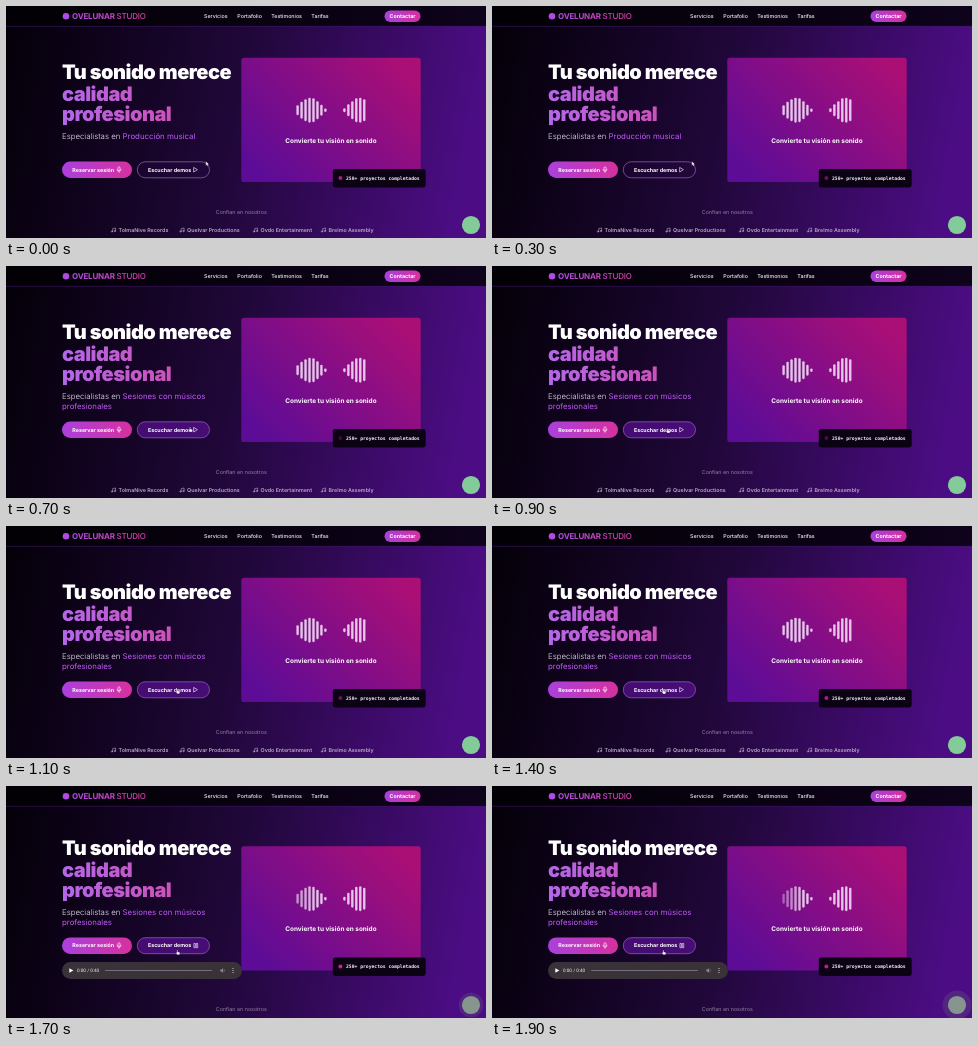
Recreate the animation shown at these times as an HTML page. Size 480 px wide and 232 px high, loop 2 s.

```html
<!DOCTYPE html>
<html lang="es">
<head>
<meta charset="utf-8">
<title>Estudio de sonido</title>
<style>
  html, body { margin: 0; width: 100%; height: 100%; overflow: hidden; background: #05000a; }
  svg { display: block; width: 480px; height: 232px; }
  text { font-family: Inter, sans-serif; font-size: 5.33px; fill: #f6f2fa; text-rendering: geometricPrecision; }
  .link { font-weight: 500; }
  .title { font-size: 20px; font-weight: 900; letter-spacing: -.025em; fill: #fff; }
  .title.tinted { fill: url(#titleInk); }
  .brand { font-size: 8px; font-weight: 700; letter-spacing: -.025em; fill: url(#brandInk); }
  .brand .light { font-weight: 500; }
  .sub { font-size: 7.85px; font-weight: 300; fill: #eae3f2; }
  .sub .topic { font-weight: 400; fill: #bd5cf2; }
  .btn { font-weight: 700; fill: #fff; }
  .slogan { font-size: 6.45px; font-weight: 700; fill: #fff; text-anchor: middle; }
  .mono { font: 700 4.72px "DejaVu Sans Mono", monospace; }
  .trust { fill: #9384a4; text-anchor: middle; }
  .partners text { font-weight: 600; fill: #b7a8c6; }
  .time { font: 4.67px Roboto, sans-serif; fill: #eee; }
  .icon { fill: none; stroke: #fff; stroke-width: .6; stroke-linecap: round; stroke-linejoin: round; }
</style>
</head>
<body>
<svg viewBox="0 0 480 232" xmlns="http://www.w3.org/2000/svg">
  <defs>
    <linearGradient id="page" gradientUnits="userSpaceOnUse" x1="5" y1="10" x2="472" y2="100">
      <stop offset="0" stop-color="#040008"/>
      <stop offset=".5" stop-color="#200739"/>
      <stop offset="1" stop-color="#4c0d84"/>
    </linearGradient>
    <linearGradient id="bar">
      <stop offset="0" stop-color="#020004"/>
      <stop offset="1" stop-color="#0e031b"/>
    </linearGradient>
    <linearGradient id="brandInk" gradientUnits="userSpaceOnUse" x1="66" y1="0" x2="141" y2="0">
      <stop offset="0" stop-color="#b04be6"/>
      <stop offset="1" stop-color="#dc3fa9"/>
    </linearGradient>
    <linearGradient id="titleInk" gradientUnits="userSpaceOnUse" x1="56" y1="0" x2="228" y2="0">
      <stop offset="0" stop-color="#b368e8"/>
      <stop offset="1" stop-color="#d9459f"/>
    </linearGradient>
    <linearGradient id="pill">
      <stop offset="0" stop-color="#ab40dc"/>
      <stop offset="1" stop-color="#d6309f"/>
    </linearGradient>
    <linearGradient id="card" gradientUnits="userSpaceOnUse" x1="263" y1="176" x2="387" y2="52">
      <stop offset="0" stop-color="#5c0c97"/>
      <stop offset="1" stop-color="#aa0f76"/>
    </linearGradient>
  </defs>

  <rect width="480" height="232" fill="url(#page)"/>

  <g id="left">
    <text class="title" x="56" y="73.2">Tu sonido merece</text>
    <text class="title tinted" x="56" y="95">calidad</text>
    <text class="title tinted" x="56" y="114.7">profesional</text>
    <text class="sub" x="56" y="132.8">Especialistas en <tspan class="topic" id="topicA">Producción musical</tspan></text>
    <text class="sub" x="56" y="132.8" id="topicB"><tspan fill-opacity="0">Especialistas en </tspan><tspan class="topic">Sesiones con músicos</tspan><tspan class="topic" x="56" y="143.2">profesionales</tspan></text>

    <rect x="56" y="155.5" width="70" height="16.5" rx="8.25" fill="url(#pill)"/>
    <text class="btn" x="66.3" y="165.6">Reservar sesión</text>
    <path class="icon" d="M112 161.8a1 1 0 0 1 2 0v1.8a1 1 0 0 1-2 0zM111 163.3a2 2 0 0 0 4 0M113 165.4v1"/>

    <rect id="demo" x="131.3" y="155.8" width="72.2" height="16" rx="8" stroke-width=".67"/>
    <text class="btn" x="142" y="165.6">Escuchar demos</text>
    <path id="playIcon" class="icon" d="M188 161.6l3.4 2.1-3.4 2.1z"/>
    <path id="pauseIcon" class="icon" d="M188.3 161.6h1v4.2h-1zM190.7 161.6h1v4.2h-1z"/>
  </g>

  <g id="player">
    <rect x="56" y="176" width="180" height="17" rx="8.5" fill="#393339"/>
    <path d="M63.3 182.2l4 2.3-4 2.3z" fill="#fff"/>
    <text class="time" x="71" y="186.2">0:00 / 0:40</text>
    <rect x="99" y="183.9" width="107" height="1.2" rx=".6" fill="#776f78"/>
    <path d="M214.3 183.6h1.2l1.5-1.4v4.6l-1.5-1.4h-1.2z" fill="#8d868e"/>
    <path class="icon" style="stroke:#8d868e" d="M218 183.2q1 1.3 0 2.6"/>
    <g fill="#ddd"><circle cx="227" cy="182.5" r=".55"/><circle cx="227" cy="184.5" r=".55"/><circle cx="227" cy="186.5" r=".55"/></g>
  </g>

  <g id="right">
    <rect x="235.3" y="51.7" width="179.4" height="124.4" rx="2.7" fill="url(#card)"/>
    <g id="waves" fill="#e3c6e8"></g>
    <text class="slogan" x="324.9" y="136.9">Convierte tu visión en sonido</text>
    <rect x="326.8" y="163" width="92.9" height="18.4" rx="2.4" fill="#0b0313"/>
    <circle id="dot" cx="334.4" cy="172" r="2" fill="#c81fa0"/>
    <text class="mono" x="340" y="173.6">250+ proyectos completados</text>
  </g>

  <g id="foot">
    <text class="trust" x="235.3" y="207.8">Confían en nosotros</text>
    <g class="partners" id="partners"></g>
  </g>

  <rect width="480" height="20" fill="url(#bar)"/>
  <rect y="19.9" width="480" height=".6" fill="#3a1666"/>
  <circle cx="60" cy="10.2" r="3.3" fill="#b04be6"/>
  <text class="brand" x="66" y="13">OVELUNAR <tspan class="light">STUDIO</tspan></text>
  <g class="link">
    <text x="198" y="12">Servicios</text>
    <text x="231.3" y="12">Portafolio</text>
    <text x="265.2" y="12">Testimonios</text>
    <text x="305.3" y="12">Tarifas</text>
  </g>
  <rect x="378.5" y="4.5" width="36" height="11.5" rx="5.75" fill="url(#pill)"/>
  <text class="btn" x="396.5" y="12.1" text-anchor="middle">Contactar</text>

  <circle id="halo" cx="465" cy="219" fill="#67587c"/>
  <circle id="chat" cx="465" cy="219" r="9.1"/>

  <g id="cursor" stroke="#1a0a26" stroke-width=".3" stroke-linejoin="round" fill="#fff">
    <path id="arrow" d="M-1.2-2v4.4l1-.9.8 1.5.8-.4-.7-1.4h1.4z"/>
    <path id="hand" d="M-.9-2.2q.5-.5.9 0v1.7l1.7.4q.5.2.4.8l-.4 1.7h-2.3l-1.4-2q.2-.6.8-.2l.3.2z"/>
  </g>
</svg>
<script>
const LOOP = 2000, OPEN_AT = 1450, HOVER_AT = 500;
const $ = id => document.getElementById(id);
const clamp = v => Math.min(1, Math.max(0, v));
const ramp = (t, a, b) => clamp((t - a) / (b - a));
const shift = (id, y) => $(id).setAttribute('transform', `translate(0 ${y})`);
const show = (id, on) => $(id).style.display = on ? '' : 'none';

function add(parent, tag, attrs, text = '') {
  const node = document.createElementNS('http://www.w3.org/2000/svg', tag);
  for (const key in attrs) node.setAttribute(key, attrs[key]);
  node.textContent = text;
  parent.append(node);
  return node;
}

const wave = (x0, heights) => heights.map((h, i) => add($('waves'), 'rect', {
  x: x0 + i * 3.97 - 1.2, y: 104.2 - h / 2, width: 2.4, height: h, rx: 1.1
}));
const leftBars = wave(291.6, [10, 17, 22, 25, 24, 18, 11, 3.5]);
wave(338.4, [4, 12, 18, 24, 25, 22]);

[[105, 'TolmaNive Records'], [173.5, 'Quelvar Productions'],
 [247, 'Ovdo Entertainment'], [315, 'Brelmo Assembly']].forEach(([x, name]) => {
  add($('partners'), 'path', {
    class: 'icon', style: 'stroke:#b7a8c6', transform: `translate(${x} 221.7)`,
    d: 'M1.7 3.8V.9L4.6.3v3M1.7 3.8a.7.7 0 1 1-1.4 0 .7.7 0 1 1 1.4 0M4.6 3.3a.7.7 0 1 1-1.4 0 .7.7 0 1 1 1.4 0'
  });
  add($('partners'), 'text', { x: x + 7.6, y: 226 }, name);
});

// Pointer path: time, x, y
const path = [[0, 201, 157.3], [350, 201, 157.3], [700, 184.5, 163.5], [1000, 171.8, 165.3], [1400, 171.8, 165.5], [1500, 171.8, 166.4], [LOOP, 171.8, 166.4]];

function pointer(t) {
  const i = path.findIndex(p => p[0] > t);
  const [t0, x0, y0] = path[i - 1], [t1, x1, y1] = path[i];
  const k = ramp(t, t0, t1);
  return [x0 + (x1 - x0) * k, y0 + (y1 - y0) * k];
}

function draw(t) {
  const open = t >= OPEN_AT;
  shift('left', open ? -4.1 : 0);
  shift('right', open ? 8.5 : 0);
  shift('foot', open ? 17.2 : 0);
  show('player', open);
  show('pauseIcon', open);
  show('playIcon', !open);

  $('topicA').style.fillOpacity = 1 - ramp(t, 350, 500);
  $('topicB').style.opacity = ramp(t, 500, 650);

  const hover = ramp(t, HOVER_AT, HOVER_AT + 150), near = ramp(t, 100, 300);
  $('demo').setAttribute('fill', `rgba(92, 18, 152, ${.05 + .6 * hover})`);
  $('demo').setAttribute('stroke', `rgb(${145 + 15 * near}, ${120 - 20 * near}, ${175 + 35 * near})`);

  $('dot').style.opacity = .63 + .37 * Math.cos((t - 1700) / LOOP * 2 * Math.PI);
  const fade = ramp(t, 1500, 1900);
  leftBars.forEach((bar, i) => bar.style.opacity = 1 - fade * Math.max(0, .55 - i * .11));

  $('chat').setAttribute('fill', open ? '#87958f' : '#83cb99');
  show('halo', open);
  $('halo').setAttribute('r', 9.5 + 5 * ramp(t, OPEN_AT, 1900));
  $('halo').style.opacity = .32;

  $('cursor').setAttribute('transform', `translate(${pointer(t).join(' ')})`);
  show('hand', t >= HOVER_AT);
  show('arrow', t < HOVER_AT);
}

const start = performance.now();
function tick() {
  draw((performance.now() - start) % LOOP);
  requestAnimationFrame(tick);
}
tick();
</script>
</body>
</html>
```
